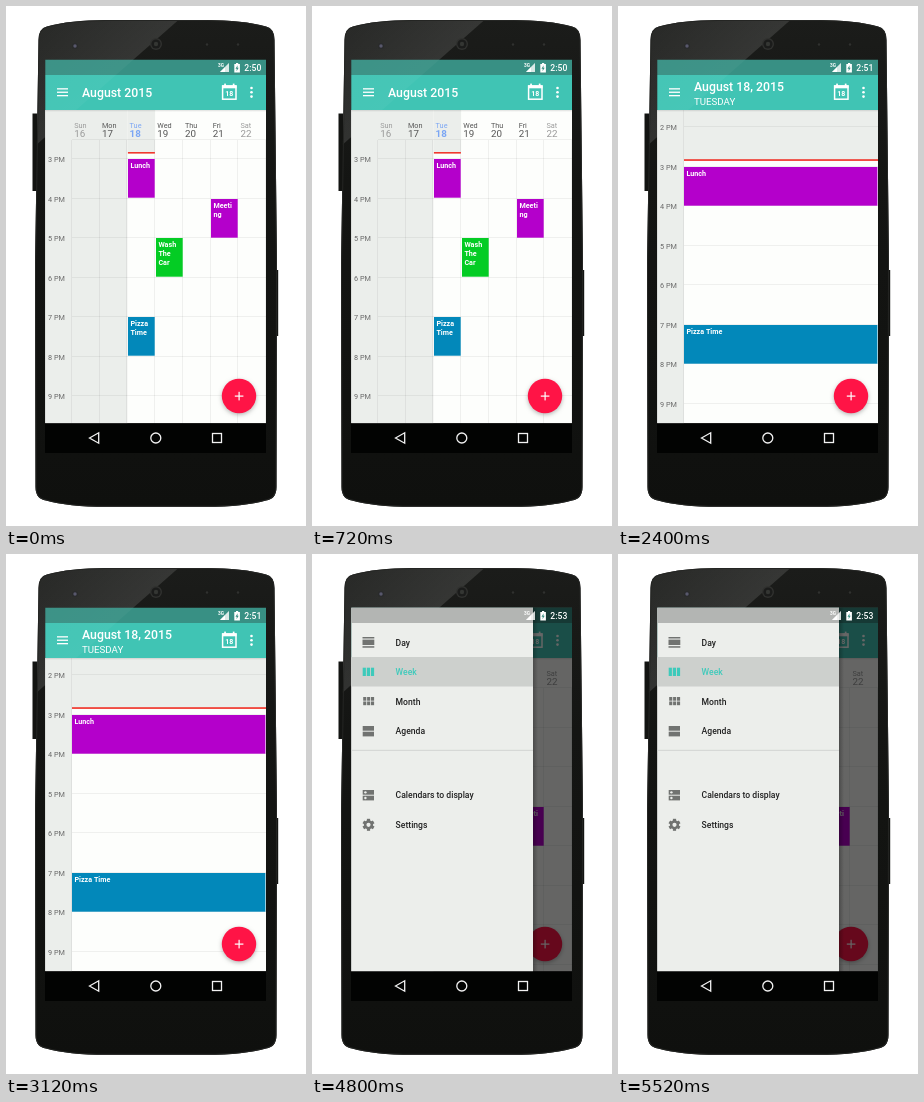
Write an HTML page with a canvas that moves like this. It is 300x520 px and loops after 6 s.

```html
<!DOCTYPE html>
<html lang="en">
<head>
<meta charset="utf-8">
<title>Calendar app views</title>
<style>
html, body { margin: 0; width: 100%; height: 100%; overflow: hidden; background: #fff; }
canvas { display: block; width: 300px; height: 520px; }
</style>
</head>
<body>
<canvas id="stage"></canvas>
<script>
const canvas = document.getElementById('stage');
const ctx = canvas.getContext('2d');
const dpr = Math.max(1, window.devicePixelRatio || 1);
canvas.width = 300 * dpr;
canvas.height = 520 * dpr;

const HOLD = 1200;
const PURPLE = '#b400cb', GREEN = '#04cc24', BLUE = '#0288ba', YELLOW = '#d0c20a';
const TEAL = '#40c4b4', RED = '#f0382e', PAPER = '#fdfefc', SHADE = '#ebeeeb';
const LINE = 'rgba(0,0,0,.055)', INK = '#333', MUTED = '#666';
const HOUR = 39.5;
const DAYS = ['Sun', 'Mon', 'Tue', 'Wed', 'Thu', 'Fri', 'Sat'];

function rect(x, y, w, h, color) {
  ctx.fillStyle = color;
  ctx.fillRect(x, y, w, h);
}

function disc(x, y, r, color) {
  ctx.fillStyle = color;
  ctx.beginPath();
  ctx.arc(x, y, r, 0, Math.PI * 2);
  ctx.fill();
}

function poly(points, color) {
  ctx.fillStyle = color;
  ctx.beginPath();
  points.forEach(([x, y]) => ctx.lineTo(x, y));
  ctx.closePath();
  ctx.fill();
}

function text(str, x, y, size, color, weight = 400, align = 'left') {
  ctx.font = `${weight} ${size}px Roboto, Arial, sans-serif`;
  ctx.fillStyle = color;
  ctx.textAlign = align;
  ctx.fillText(str, x, y);
}

function gradient(x0, y0, x1, y1, ...colors) {
  const g = ctx.createLinearGradient(x0, y0, x1, y1);
  colors.forEach((c, i) => g.addColorStop(i / (colors.length - 1), c));
  return g;
}

function clipTo(x, y, w, h, draw) {
  ctx.save();
  ctx.beginPath();
  ctx.rect(x, y, w, h);
  ctx.clip();
  draw();
  ctx.restore();
}

function bodyPath() {
  ctx.beginPath();
  ctx.moveTo(32.5, 34);
  ctx.quadraticCurveTo(32.5, 22.5, 41, 20.5);
  ctx.quadraticCurveTo(64, 14, 100, 14);
  ctx.lineTo(200, 14);
  ctx.quadraticCurveTo(237, 14, 260, 20.5);
  ctx.quadraticCurveTo(268.5, 22.5, 268.5, 34);
  ctx.lineTo(271, 260);
  ctx.lineTo(270.5, 481);
  ctx.quadraticCurveTo(270.5, 493, 260, 494.5);
  ctx.quadraticCurveTo(238, 500.8, 200, 500.8);
  ctx.lineTo(100, 500.8);
  ctx.quadraticCurveTo(62, 500.8, 40, 494.5);
  ctx.quadraticCurveTo(29.5, 493, 29.5, 481);
  ctx.lineTo(29, 260);
  ctx.closePath();
}

// Diagonal reflection across the upper left of the glass.
function drawGloss(alpha) {
  poly([[28, 10], [177, 10], [28, 141]],
    gradient(60, 10, 120, 78, `rgba(255,255,255,${alpha / 2})`, `rgba(255,255,255,${alpha})`));
}

function drawPhone() {
  rect(26.5, 107.5, 5, 77.5, '#131412');
  rect(268, 264, 4.2, 66, '#131412');
  bodyPath();
  ctx.fillStyle = gradient(0, 14, 0, 501, '#1b1c1a', '#141513', '#121311', '#0f100e');
  ctx.fill();
  ctx.save();
  ctx.clip();
  drawGloss(0.13);
  bodyPath();
  ctx.strokeStyle = '#242523';
  ctx.lineWidth = 2;
  ctx.stroke();
  ctx.restore();
  disc(150, 38, 6, '#30312f');
  disc(150, 38, 4.6, '#1b1c1b');
  disc(150, 38, 2.2, '#343633');
  disc(69, 40, 3, '#2a2b2c');
  disc(69, 40, 1.7, '#58586c');
  for (const x of [201, 232]) disc(x, 38.5, 1.2, '#30312f');
}

function drawNav() {
  rect(39, 417.4, 221, 29.6, '#020302');
  ctx.strokeStyle = '#f2f2f2';
  ctx.lineWidth = 1.3;
  ctx.beginPath();
  ctx.moveTo(83.5, 432);
  ctx.lineTo(92.7, 426.8);
  ctx.lineTo(92.7, 437.2);
  ctx.closePath();
  ctx.stroke();
  ctx.beginPath();
  ctx.arc(149.8, 432, 5, 0, Math.PI * 2);
  ctx.stroke();
  ctx.strokeRect(206.5, 427.5, 9, 9);
}

function drawStatus(time) {
  text('3G', 212, 60.8, 4.8, '#fff', 700);
  poly([[214, 66], [223, 66], [223, 57]], 'rgba(255,255,255,.45)');
  poly([[214, 66], [219, 66], [219, 61]], '#fff');
  poly([[219, 66], [223, 66], [223, 57], [219, 61]], 'rgba(255,255,255,.65)');
  rect(228.3, 58, 5.6, 8.5, '#fff');
  rect(230, 57, 2.2, 1, '#fff');
  poly([[231.6, 59.3], [229.5, 62.8], [230.8, 62.8], [230.5, 65.2], [232.7, 61.7], [231.4, 61.7]], '#3a8f83');
  text(time, 255.3, 65.2, 8.6, '#fff', 500, 'right');
}

function drawToolbar(title, sub) {
  rect(39, 53, 221, 16, '#389084');
  rect(39, 69, 221, 35, TEAL);
  rect(39, 104, 221, 2, gradient(0, 104, 0, 106, 'rgba(0,0,0,.12)', 'rgba(0,0,0,0)'));
  clipTo(39, 53, 221, 51, () => drawGloss(0.04));
  for (const y of [82.2, 85.6, 89]) rect(51, y, 11, 1.3, '#fff');
  text(title, 76, sub ? 85 : 91, 12.3, '#fff', 500);
  if (sub) text(sub, 76, 98.6, 9.7, '#fff');
  ctx.strokeStyle = '#fff';
  ctx.lineWidth = 1.5;
  ctx.strokeRect(216.6, 80, 13.4, 13.2);
  rect(216, 79.3, 14.6, 3, '#fff');
  rect(218.2, 77.6, 1.7, 2.5, '#fff');
  rect(226.8, 77.6, 1.7, 2.5, '#fff');
  text('18', 223.3, 89.7, 7, '#fff', 700, 'center');
  for (const y of [82, 86.3, 90.6]) disc(245.5, y, 1.3, '#fff');
}

function drawFab() {
  ctx.save();
  ctx.shadowColor = 'rgba(0,0,0,.28)';
  ctx.shadowBlur = 4 * dpr;
  ctx.shadowOffsetY = 1.6 * dpr;
  disc(233, 390, 17.2, '#ff1446');
  ctx.restore();
  rect(228.8, 389.5, 8.6, 1.2, '#fff');
  rect(232.5, 385.8, 1.2, 8.6, '#fff');
}

function drawHours(first, top) {
  for (let i = 0; top + i * HOUR < 417; i++) {
    const y = Math.round(top + i * HOUR);
    rect(66, y - 1, 194, 1, LINE);
    text(`${first + i} PM`, 42, y + 2.6, 7.3, MUTED);
  }
}

function block(x, y, w, color, lines) {
  x = Math.round(x);
  y = Math.round(y);
  rect(x, y, w, 38.7, color);
  lines.forEach((s, i) => text(s, x + 2.4, y + 9.2 + i * 8.7, 7.2, '#fff', 700));
}

function drawWeek(shift = 0) {
  const col = i => 66 + i * 27.7;
  const at = hour => 153 + shift + (hour - 3) * HOUR;
  const now = at(3) - 7;
  rect(39, 104, 221, 313.4, PAPER);
  rect(39, 104, 82.4, 313.4, SHADE);
  rect(col(2), 104, 27.7, now - 104, SHADE);
  clipTo(39, 134, 221, 283.4, () => {
    drawHours(shift ? 2 : 3, at(shift ? 2 : 3));
    for (let i = 0; i < 8; i++) rect(Math.round(col(i)) - 1, 134, 1, 283.4, LINE);
    rect(col(2) + 0.5, now, 27, 1.6, RED);
    block(col(2) + 0.6, at(3), 26.7, PURPLE, ['Lunch']);
    block(col(5) + 0.6, at(4), 26.7, PURPLE, ['Meeti', 'ng']);
    block(col(3) + 0.6, at(5), 26.7, GREEN, ['Wash', 'The', 'Car']);
    block(col(2) + 0.6, at(7), 26.7, BLUE, ['Pizza', 'Time']);
  });
  rect(66, 133, 194, 1, LINE);
  DAYS.forEach((d, i) => {
    const color = i === 2 ? '#7ba6f4' : i % 6 ? '#555' : '#999';
    text(d, col(i) + 2.2, 121.7, 7.3, color);
    text(16 + i, col(i) + 2.2, 131.3, 9.8, color, i === 2 ? 700 : 400);
  });
}

function drawMonth() {
  const w = 221 / 7, h = 51.1;
  const left = c => 39 + c * w, top = r => 114 + r * h;
  rect(39, 104, 221, 313.4, PAPER);
  rect(39, 104, 221, 10, SHADE);
  DAYS.forEach((d, c) => text(d.toUpperCase(), left(c + 1) - 2.4, 111.3, 6.6, '#858585', 400, 'right'));
  for (let i = 0; i < 42; i++) {
    const c = i % 7, r = Math.floor(i / 7), day = i - 5;
    const out = day < 1 || day > 31, today = day === 18;
    if (out) rect(left(c), top(r), w, h, '#eff1ef');
    if (today) rect(left(c), top(r), w, h, '#f1fdd5');
    const label = day < 1 ? day + 31 : day > 31 ? day - 31 : day;
    text(label, left(c + 1) - 2.2, top(r) + 13.6, 12.3, out ? '#999' : INK, today ? 500 : 400, 'right');
  }
  for (let i = 0; i < 7; i++) {
    if (i < 6) rect(39, Math.round(top(i)) - 1, 221, 1, LINE);
    if (i) rect(Math.round(left(i)) - 1, 114, 1, 303.4, LINE);
  }

  const chip = (c, y, color, label) => {
    rect(left(c) + 0.3, y, 2.9, 7.5, color);
    text(label, left(c) + 4.8, y + 6.2, 6, '#222', 500);
  };
  const band = (c, y, span, color, label) => {
    rect(left(c) + 0.2, y, w * span - 0.4, 10, color);
    for (let i = 0; i < span; i++) text(label, left(c + i) + 2, y + 7.3, 6.1, '#fff', 500);
  };
  chip(1, 236, BLUE, 'Travel');
  band(6, 237, 1, YELLOW, 'Travel');
  chip(6, 247.5, BLUE, 'Work');
  chip(2, 287.5, PURPLE, 'Lunch');
  chip(2, 296, BLUE, 'Pizza Ti…');
  chip(3, 287.5, GREEN, 'Wash T…');
  chip(5, 287.5, PURPLE, 'Meeting');
  band(1, 339, 2, PURPLE, 'To Riyadh');
  chip(6, 338.5, BLUE, 'Meeting');
}

function drawDay() {
  rect(39, 104, 221, 313.4, PAPER);
  rect(39, 104, 27, 313.4, SHADE);
  rect(66, 104, 194, 50, SHADE);
  drawHours(2, 121);
  rect(65, 104, 1, 313.4, LINE);
  rect(66, 153.2, 194, 1.7, RED);
  block(66.3, 160.5, 193.4, PURPLE, ['Lunch']);
  block(66.3, 318.5, 193.4, BLUE, ['Pizza Time']);
}

function drawAgenda() {
  const rule = '#dfe1df';
  rect(39, 104, 221, 313.4, PAPER);
  rect(39, 104, 221, 72, '#dbdedb');
  rect(49.2, 110.5, 14.7, 29.5, YELLOW);
  text('Travel', 69, 124, 11, '#444');
  text('August 15', 69, 136, 8.5, MUTED);
  rect(39, 145.3, 221, 1.4, RED);

  const heading = (y, label, day) => {
    text(label, 49.3, y + 9.7, 7.1, MUTED);
    text(`August ${day}`, 49.3, y + 23, 14.7, MUTED);
    rect(39, y + 29, 221, 1, rule);
  };
  const item = (y, color, title, when) => {
    rect(49.2, y, 14.7, 14.7, color);
    text(title, 69, y + 13, 11, '#222', 700);
    text(when, 69, y + 24.8, 8.5, MUTED);
    rect(39, y + 34, 221, 1, rule);
  };
  heading(147, 'TODAY, TUESDAY', 18);
  item(181, PURPLE, 'Lunch', '3:00 – 4:00 PM');
  item(220, BLUE, 'Pizza Time', '7:00 – 8:00 PM (GMT+03:00)');
  heading(255, 'TOMORROW, WEDNESDAY', 19);
  item(289, GREEN, 'Wash The Car', '5:00 – 6:00 PM (GMT+03:00)');
  heading(324, 'FRIDAY', 21);
  item(358, PURPLE, 'Meeting', '4:00 – 5:00 PM (GMT+03:00)');
  heading(393, 'MONDAY', 24);
}

function drawGear(x, y) {
  for (let i = 0; i < 6; i++) {
    ctx.save();
    ctx.translate(x, y);
    ctx.rotate(i * Math.PI / 3);
    rect(-1.6, -6, 3.2, 4, '#717371');
    ctx.restore();
  }
  disc(x, y, 4.6, '#717371');
  disc(x, y, 2.1, '#eceeeb');
}

function drawDrawer() {
  rect(39, 53, 221, 365, 'rgba(0,0,0,.6)');
  rect(221, 53, 5, 365, gradient(221, 0, 226, 0, 'rgba(0,0,0,.25)', 'rgba(0,0,0,0)'));
  rect(39, 53, 182, 365, '#eceeeb');
  rect(39, 53, 182, 16, '#b3b5b3');
  rect(39, 103, 182, 29.5, '#cdd0cd');
  rect(39, 195.8, 182, 1, '#d2d4d2');

  const gray = '#717371';
  rect(50.5, 83, 11.8, 1.5, gray);
  rect(50.5, 85.6, 11.8, 5.4, gray);
  rect(50.5, 92.2, 11.8, 1.5, gray);
  for (let i = 0; i < 3; i++) {
    rect(50.7 + i * 4.1, 113.7, 3.2, 8.3, '#3dcabb');
    for (let j = 0; j < 2; j++) rect(51.2 + i * 3.9, 143 + j * 4.5, 3.1, 3.7, gray);
  }
  for (const y of [172, 177.7]) rect(50.7, y, 11.3, 4.7, gray);
  for (const y of [236, 241.7]) {
    rect(50.7, y, 11.3, 4.7, gray);
    disc(53.4, y + 2.35, 1.2, '#eceeeb');
  }
  drawGear(56.5, 270.8);

  const entries = [['Day', 91.6], ['Week', 121], ['Month', 150.5], ['Agenda', 180],
    ['Calendars to display', 244.2], ['Settings', 273.8]];
  for (const [label, y] of entries) {
    text(label, 83.6, y, 8.6, label === 'Week' ? '#3dcabb' : '#222', 500);
  }
}

const scenes = [
  { time: '2:50', title: 'August 2015', draw: () => drawWeek() },
  { time: '2:47', title: 'August 2015', draw: drawMonth },
  { time: '2:51', title: 'August 18, 2015', sub: 'TUESDAY', draw: drawDay },
  { time: '2:52', title: 'August 15, 2015', sub: 'SATURDAY', draw: drawAgenda },
  { time: '2:53', title: 'August 2015', draw: () => drawWeek(60.3), drawer: true }
];

function render(scene) {
  ctx.setTransform(dpr, 0, 0, dpr, 0, 0);
  rect(0, 0, 300, 520, '#fff');
  drawPhone();
  clipTo(39.3, 53.7, 220.7, 363.7, () => {
    scene.draw();
    drawToolbar(scene.title, scene.sub);
    drawFab();
    if (scene.drawer) drawDrawer();
    drawStatus(scene.time);
  });
  drawNav();
}

const start = performance.now();
function tick() {
  const t = performance.now() - start;
  render(scenes[Math.floor(t / HOLD) % scenes.length]);
  requestAnimationFrame(tick);
}
tick();
</script>
</body>
</html>
```
